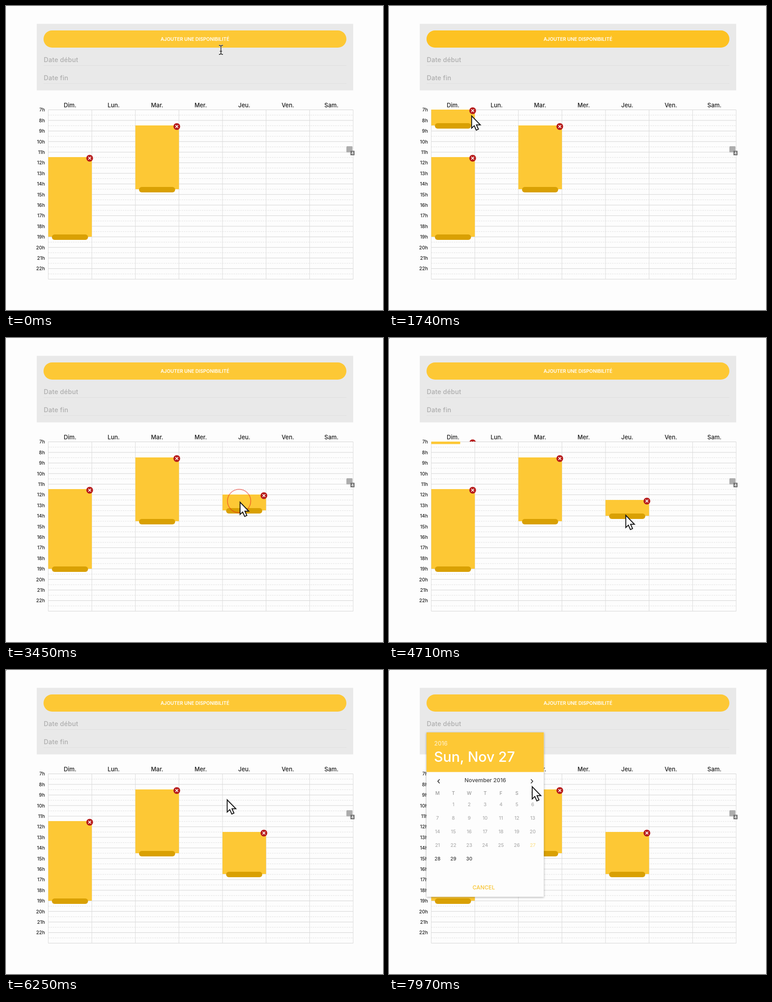
Animation, 834 px wide and 672 px high, one loop 8000 ms. Source, as an HTML page:

```html
<!DOCTYPE html>
<html lang="fr">
<head>
<meta charset="utf-8">
<title>Disponibilités</title>
<style>
  html, body { margin: 0; width: 100%; height: 100%; overflow: hidden; background: #fdfdfd; }
  svg { display: block; width: 834px; height: 672px; font-family: Inter, "Open Sans", sans-serif; font-weight: 500; }
  .middle { text-anchor: middle; }
  .right { text-anchor: end; }
</style>
</head>
<body>
<svg viewBox="0 0 834 672">
  <defs>
    <path id="beamShape" d="M-4.5-10H-2L0-8 2-10H4.5M-4.5 10H-2L0 8 2 10H4.5M0-8V8M-2.5 3H2.5"/>
  </defs>
  <rect x="68" y="39.5" width="700" height="147" fill="#e9e9e9"/>
  <rect x="83" y="54" width="670" height="38" rx="19" fill="#fdc835"/>
  <rect id="hover" x="83" y="54" width="670" height="38" rx="19" fill="#fdba08"/>
  <text class="middle" x="418" y="77" font-size="10.5" font-weight="600" fill="#fff">AJOUTER UNE DISPONIBILITÉ</text>
  <g font-size="14.2" fill="#adadad" letter-spacing=".2">
    <text x="83.5" y="123.5">Date début</text>
    <text x="83.5" y="163.5">Date fin</text>
  </g>
  <path d="M83 131.5H753M83 171.5H753" stroke="#dfdfdf"/>
  <g id="grid"></g>
  <g id="blocks"></g>
  <g id="remnant">
    <rect x="93.5" y="229" width="64" height="5.5" fill="#fdc835"/>
    <path d="M178 229a7.5 7.5 0 0 1 14 0z" fill="#b71c1c"/>
    <path d="M182 228l1 1M188 228l-1 1" stroke="#fff"/>
  </g>
  <rect x="753" y="310" width="13.5" height="13.5" rx="1.5" fill="#adadad"/>
  <rect x="762" y="320" width="9" height="10" fill="#737373"/>
  <text class="middle" x="766.5" y="328" font-size="8" font-weight="700" fill="#fff">4</text>
  <rect id="corner" width="1" height="1"/>
  <g id="picker">
    <rect x="83" y="138" width="259.5" height="363.5" fill="#fdfdfd" style="filter:drop-shadow(0 1px 2px rgba(0,0,0,.35))"/>
    <rect x="83" y="138" width="259.5" height="87.5" fill="#fdc835"/>
    <text x="100" y="166.5" font-size="12.8" fill="#fff" fill-opacity=".7">2016</text>
    <text x="99.5" y="203" font-size="31" fill="#fff">Sun, Nov 27</text>
    <text class="middle" x="213" y="247.5" font-size="12.2" fill="#444">November 2016</text>
    <path d="M112 241.5l-4 4.5 4 4.5M314 241.5l4 4.5-4 4.5" fill="none" stroke="#333" stroke-width="1.8"/>
    <text class="middle" x="209.5" y="485" font-size="12.2" fill="#f8c432">CANCEL</text>
    <g id="days" class="middle" font-size="10.5"></g>
  </g>
  <circle id="ring" r="25.8" fill="none" stroke="#e8291c" stroke-opacity=".52" stroke-width="1.8"/>
  <g id="arrow">
    <path d="M.8 1V28L6.6 22.6 11 32.4 15.8 30.3 11.4 20.7H20Z" fill="#fff" stroke="#161616" stroke-width="2"/>
  </g>
  <g id="beam" fill="none">
    <use href="#beamShape" stroke="#fff" stroke-opacity=".6" stroke-width="3.6"/>
    <use href="#beamShape" stroke="#484848" stroke-width="2"/>
  </g>
</svg>
<script>
const LOOP = 8000, TICK = 130;
const LEFT = 93.5, TOP = 229.5, COLUMN = 96.36, HOUR = 23.4, FIRST = 7, HOURS = 16;
const $ = id => document.getElementById(id);
const clamp = (v, min, max) => Math.min(Math.max(v, min), max);
const within = (t, from, to) => t >= from && t < to;

function add(parent, tag, attrs, text = '') {
  const node = document.createElementNS('http://www.w3.org/2000/svg', tag);
  for (const key in attrs) node.setAttribute(key, attrs[key]);
  node.textContent = text;
  parent.append(node);
  return node;
}
const show = (node, on) => node.setAttribute('visibility', on ? 'visible' : 'hidden');
const place = (node, x, y) => node.setAttribute('transform', `translate(${x} ${y})`);

function drawGrid() {
  const grid = $('grid'), right = LEFT + 7 * COLUMN, bottom = TOP + HOURS * HOUR;
  const line = (d, stroke, dash = 'none') => add(grid, 'path', { d, stroke, 'stroke-dasharray': dash });
  for (let i = 0; i <= HOURS; i++) {
    const y = TOP + i * HOUR;
    line(`M${LEFT} ${y}H${right}`, '#d3d3d3');
    if (i === HOURS) break;
    line(`M${LEFT} ${y + HOUR / 2}H${right}`, '#dedede', '3 2');
    add(grid, 'text', { class: 'right', x: 86, y: y + 3.8, 'font-size': 10.5, fill: '#1c1c1c' }, `${FIRST + i}h`);
  }
  for (let i = 0; i <= 7; i++) line(`M${LEFT + i * COLUMN} ${TOP}V${bottom}`, '#dadada');
  ['Dim.', 'Lun.', 'Mar.', 'Mer.', 'Jeu.', 'Ven.', 'Sam.'].forEach((name, i) =>
    add(grid, 'text', { class: 'middle', x: LEFT + (i + .5) * COLUMN, y: 224, 'font-size': 12.9, fill: '#1c1c1c' }, name));
}

function makeBlock() {
  const group = add($('blocks'), 'g', {});
  const body = add(group, 'rect', { width: COLUMN, fill: '#fdc835' });
  const handle = add(group, 'rect', { x: 8, width: 80, height: 12, rx: 6, fill: '#d9a003' });
  add(group, 'circle', { cx: 91.6, cy: 2.4, r: 7.5, fill: '#b71c1c' });
  add(group, 'path', { d: 'M88.6-.6l6 6m0-6l-6 6', stroke: '#fff', 'stroke-width': 1.5 });
  const rowY = hour => Math.round(TOP - .5 + (hour - FIRST) * HOUR);
  return (column, start, end) => {
    const height = rowY(end) - rowY(start);
    place(group, LEFT + column * COLUMN, rowY(start));
    body.setAttribute('height', height);
    handle.setAttribute('y', height - 5);
    return group;
  };
}

function drawDays() {
  const cell = (column, y, text, fill) =>
    add($('days'), 'text', { x: 107.3 + column * 35.1, y: y + 3.8, fill }, text);
  [...'MTWTFSS'].forEach((letter, i) => cell(i, 272, letter, '#999'));
  for (let day = 1; day <= 30; day++) {
    const fill = day < 27 ? '#adadad' : day === 27 ? '#fbe08d' : '#333';
    cell(day % 7, 297 + Math.floor(day / 7) * 30.1, day, fill);
  }
}

// Stops of the pointer: time, x, y
const route = [
  [0, 475.5, 97], [650, 466, 78], [910, 466, 78], [1040, 459, 80], [1300, 459, 80],
  [1690, 182, 242], [2470, 180, 240], [2600, 252, 252], [3120, 501, 354], [3510, 525, 366],
  [4290, 523, 391], [4940, 523, 391], [5460, 524, 427], [5850, 524, 455], [5980, 524, 455],
  [6500, 453, 117], [7410, 453, 117], [7930, 316, 257]
];
const presses = [[1010, 1130], [2480, 3930], [4840, 6120], [7270, 7450]];

function pointerAt(t) {
  const next = route.findIndex(stop => stop[0] > t);
  if (next < 0) return route.at(-1).slice(1);
  if (next === 0) return route[0].slice(1);
  const [t0, x0, y0] = route[next - 1], [t1, x1, y1] = route[next];
  const k = (t - t0) / (t1 - t0);
  return [x0 + (x1 - x0) * k, y0 + (y1 - y0) * k];
}

const snapHour = y => FIRST + Math.round((y - TOP) / HOUR * 2) / 2;

// The new slot follows the pointer in the first drag, its end does so in the second.
function slotAt(frame) {
  const [x, y] = pointerAt(clamp(frame, 2470, 3510));
  const column = Math.round((x - 77 - LEFT) / COLUMN), start = snapHour(y - 12);
  const end = frame < 4940 ? start + 1.5 : snapHour(pointerAt(Math.min(frame, 5850))[1]);
  return [column, start, end];
}

drawGrid();
drawDays();
makeBlock()(0, 11.5, 19);
makeBlock()(2, 8.5, 14.5);
const setSlot = makeBlock();

function render(t) {
  const frame = Math.floor(t / TICK) * TICK;
  const isBeam = t < 100 || within(t, 6500, 7500);
  const [x, y] = pointerAt(frame), [ringX, ringY] = pointerAt(frame - 22);
  place($('beam'), x, y);
  place($('arrow'), x, y);
  place($('ring'), ringX, ringY - 1);
  show($('beam'), isBeam);
  show($('arrow'), t >= 700 && !isBeam);
  show($('ring'), presses.some(([from, to]) => within(t, from, to)));
  show(setSlot(...slotAt(frame)), t >= 1130);
  $('hover').setAttribute('opacity', t < 440 ? 0 : clamp((1890 - frame) / 500, 0, 1));
  $('picker').setAttribute('opacity', clamp((frame - 7400) / 400, 0, 1));
  show($('remnant'), within(t, 4260, 4840));
  show($('corner'), t >= 4260);
}

const began = performance.now();
function tick() {
  render((performance.now() - began) % LOOP);
  requestAnimationFrame(tick);
}
tick();
</script>
</body>
</html>
```
